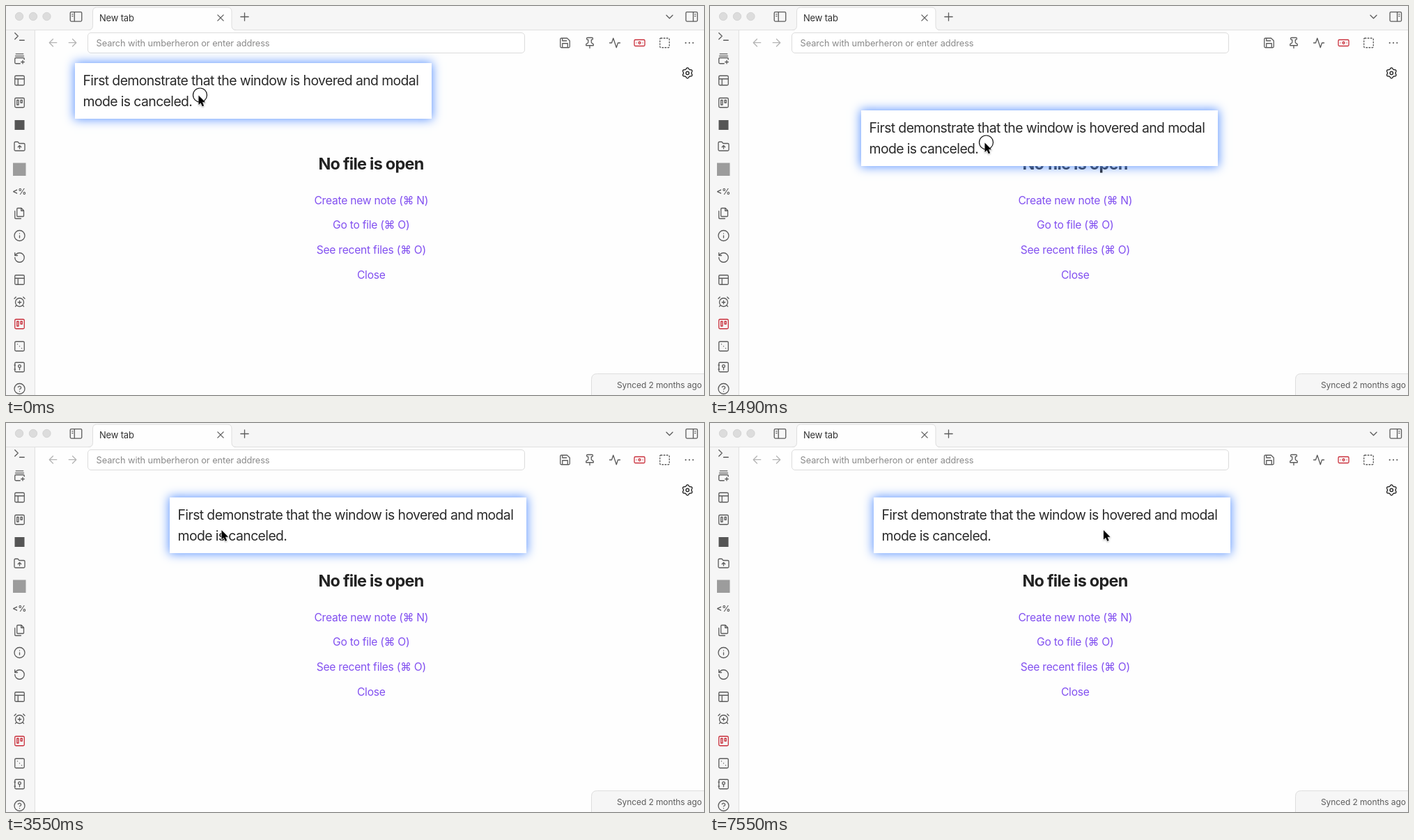
Animation of 1002 by 559 pixels, one loop 8 s. Source, as an HTML page:

```html
<!DOCTYPE html>
<html lang="en">
<head>
<meta charset="utf-8">
<title>Hover window</title>
<style>
html, body { margin: 0; width: 100%; height: 100%; overflow: hidden; background: #fefefe; }
body { position: relative; font-family: Inter, "DejaVu Sans", sans-serif; }
svg { position: absolute; left: 0; top: 0; display: block; overflow: visible; }
text { fill: #222; }
.icon { fill: none; stroke: #5c5c5c; stroke-width: 1.75; stroke-linecap: round; stroke-linejoin: round; }
.red { stroke: #c9303c; }
.pale { stroke: #b4b4b4; }
.dark { stroke: #1c1c1c; }
.small { font-size: 13px; letter-spacing: -.015em; fill: #333; }
.hint { font-size: 12.8px; letter-spacing: -.006em; fill: #8a8a8a; }
.status { font-size: 12px; letter-spacing: -.008em; fill: #5c5c5c; }
.title { font-size: 23.4px; font-weight: 650; letter-spacing: -.031em; text-anchor: middle; }
.link { font-size: 15.6px; letter-spacing: -.015em; text-anchor: middle; fill: #8250f0; }
.code { font-size: 12px; font-weight: 600; text-anchor: middle; fill: #555; }
#note {
  position: absolute; left: 0; top: 0; width: 512px; height: 80px; box-sizing: border-box;
  padding: 10px 0 0 11.5px; background: #fff; box-shadow: 0 0 14px 1px #5c94ff;
  color: #2a2a2a; font-size: 19.4px; line-height: 30px; letter-spacing: -.031em; white-space: nowrap;
}
#pointer { filter: drop-shadow(0 1px 1px rgba(0, 0, 0, .3)); }
</style>
</head>
<body>
<svg id="app" width="1002" height="559" viewBox="0 0 1002 559">
  <rect width="1002" height="34.5" fill="#f6f6f6"/>
  <rect y="34" width="41" height="525" fill="#f6f6f6"/>
  <path d="M0 34.5H1002M41.5 35V559" stroke="#e0e0e0" fill="none"/>
  <path d="M118 35q6.5 0 6.500-6V8q0-6 6-6H318q6 0 6 6V29q0 6 6.500 6z" fill="#fefefe"/>
  <path d="M118 34.500q6.500 0 6.500-6V8q0-6 6-6H318q6 0 6 6V28.500q0 6 6.500 6" fill="none" stroke="#dedede"/>
  <g fill="#dcdcdc" stroke="#cfcfcf" stroke-width=".8">
    <circle cx="19" cy="15" r="5.700"/><circle cx="39" cy="15" r="5.700"/><circle cx="58.500" cy="15" r="5.700"/>
  </g>
  <rect x="117.500" y="38.500" width="627" height="29" rx="4.500" fill="#fff" stroke="#dcdcdc"/>
  <path d="M840.500 560V536.500q0-8 8-8H1003V560z" fill="#f6f6f6" stroke="#dedede"/>

  <rect x="12.500" y="164" width="14" height="14" fill="#555"/>
  <rect x="10" y="225.500" width="18.500" height="18.500" fill="#9c9c9c"/>
  <text class="code" x="19.300" y="270.500">&lt;%</text>

  <text class="small" x="134" y="21.700">New tab</text>
  <text class="hint" x="129.500" y="57.500">Search with umberheron or enter address</text>
  <text class="title" x="524" y="234.500">No file is open</text>
  <text class="link" x="524.300" y="284.500">Create new note (⌘ N)</text>
  <text class="link" x="524.300" y="320.300">Go to file (⌘ O)</text>
  <text class="link" x="524.300" y="356">See recent files (⌘ O)</text>
  <text class="link" x="524.300" y="391.700">Close</text>
  <text class="status" x="877" y="548.700">Synced 2 months ago</text>
</svg>

<div id="note">First demonstrate that the window is hovered and modal<br>mode is canceled.</div>

<svg width="1002" height="559" viewBox="0 0 1002 559">
  <g id="hand">
    <path id="pointer" d="M0 0V13.500L3.100 10.700 5.300 15.700 7.600 14.700 5.500 9.800 9.600 9.700Z"
      fill="#000" stroke="#fff" stroke-width="1.100" paint-order="stroke"/>
    <circle id="press" cx="2" cy="-.5" r="10" fill="none" stroke="#111" stroke-width="1.200"/>
  </g>
</svg>

<script>
const $ = id => document.getElementById(id);

// Icons, drawn on a 24 unit grid around (12, 12)
const ring = (x, y, r) => `M${x - r} ${y}a${r} ${r} 0 1 0 ${2 * r} 0a${r} ${r} 0 1 0 ${-2 * r} 0`;
const box = (x, y, w, h, r = 2) =>
  `M${x + r} ${y}h${w - 2 * r}q${r} 0 ${r} ${r}v${h - 2 * r}q0 ${r} ${-r} ${r}` +
  `h${2 * r - w}q${-r} 0 ${-r} ${-r}v${2 * r - h}q0 ${-r} ${r} ${-r}z`;
const dot = (x, y) => `M${x} ${y}h.01`;

const gear = () => {
  const rim = Array.from({ length: 72 }, (_, i) => {
    const a = i * Math.PI / 36;
    const r = 8.8 + 1.2 * Math.cos(6 * a);
    return (12 + r * Math.sin(a)).toFixed(2) + ' ' + (12 - r * Math.cos(a)).toFixed(2);
  });
  return `M${rim.join('L')}z` + ring(12, 12, 3);
};

const frame = box(3, 3, 18, 18);
const layout = frame + 'M3 9h18M9 21V9';
const board = frame + box(7, 7, 3, 9, 0) + box(14, 7, 3, 5, 0);
const disc = ring(12, 12, 10);

const icons = [
  // ribbon
  [19.5, 44, 'M3 17l6-6-6-6M12 19h9'],
  [19.5, 76, 'M5 2.500h14M4 6.500h16M21 13v-1q0-2-2-2H5q-2 0-2 2v7q0 2 2 2h8M18 15v6M15 18h6'],
  [19.5, 107, layout],
  [19.5, 139, board],
  [19.5, 202, 'M4 20h16a2 2 0 0 0 2-2V8a2 2 0 0 0-2-2h-8q-1 0-1.600-.9l-.8-1.200Q9 3 8 3H4a2 2 0 0 0-2 2v13a2 2 0 0 0 2 2zM12 10v6M9 13l3-3 3 3'],
  [19.5, 298, 'M15.500 2H8.500Q7 2 7 3.500v13Q7 18 8.500 18h10q1.500 0 1.500-1.500v-10zM15 2v5h5M3 7.600v13Q3 22 4.500 22h10'],
  [19.5, 330, disc + 'M12 16v-4' + dot(12, 8)],
  [19.5, 361.5, 'M3 12a9 9 0 1 0 9-9 9.750 9.750 0 0 0-6.740 2.740L3 8M3 3v5h5'],
  [19.5, 393.5, layout],
  [19.5, 425, ring(12, 13, 8) + 'M5 3 2 6M22 6l-3-3M6.400 18.700 4 21M17.600 18.700 20 21M12 10v6M9 13h6'],
  [19.5, 457, board, 'red'],
  [19.5, 489, frame + dot(8, 8) + dot(12, 12) + dot(16, 16)],
  [19.5, 519, frame + ring(12, 10, 2.5) + 'M12 12.500v4.500M2 8h2M2 16h2'],
  [19.5, 550, disc + 'M9.100 9a3 3 0 0 1 5.800 1c0 2-3 3-3 3' + dot(12, 17)],
  // tab bar
  [100.5, 15.3, box(1, 3, 22, 18) + 'M9 3v18M4.500 7.500h1.500M4.500 11h1.500'],
  [308, 17, 'M6.500 6.500l11 11M17.500 6.500l-11 11'],
  [342.5, 15.5, 'M12 4.500v15M4.500 12h15'],
  [952.5, 15.5, 'M6 9l6 6 6-6'],
  [984.3, 15.3, box(1, 3, 22, 18) + 'M15 3v18M18 7.500h1.500M18 11h1.500'],
  // toolbar
  [67.5, 52.7, 'M19 12H5M12 19l-7-7 7-7', 'pale'],
  [95.5, 52.7, 'M5 12h14M12 5l7 7-7 7', 'pale'],
  [802.5, 53, 'M19 21H5q-2 0-2-2V5q0-2 2-2h11l5 5v11q0 2-2 2zM17 21v-8H7v8M7 3v5h8'],
  [838, 53, 'M12 17v5M5 17h14v-1.800q0-1.200-1.100-1.800l-1.800-.9Q15 12 15 10.800V6h1a2 2 0 0 0 0-4H8a2 2 0 0 0 0 4h1v4.800q0 1.200-1.100 1.700l-1.800.9Q5 14 5 15.200z'],
  [874, 53, 'M22 12h-4l-3 9L9 3l-3 9H2'],
  [909.5, 53, box(2, 6, 20, 12) + ring(12, 12, 2) + dot(6, 12) + dot(18, 12), 'red'],
  [945.5, 53, frame, '', '2.2 3.2'],
  [981, 53, ring(5, 12, .6) + ring(12, 12, .6) + ring(19, 12, .6)],
  [978.3, 96.3, gear(), 'dark'],
];

for (const [x, y, d, tone = '', dash] of icons) {
  const path = document.createElementNS('http://www.w3.org/2000/svg', 'path');
  path.setAttribute('d', d);
  path.setAttribute('class', 'icon ' + tone);
  path.setAttribute('transform', `translate(${x} ${y}) scale(.75) translate(-12 -12)`);
  if (dash) path.setAttribute('stroke-dasharray', dash);
  $('app').append(path);
}

// Each move: first step, last step, number of steps, evenly spaced waypoints
const LOOP = 8000;
const RELEASE = 2670;
const GRIP = [177.5, 46.5];

const drag = [
  [450, 750, 3, [[99, 82], [171, 99]]],
  [1050, 2080, 8, [[171, 99], [204.5, 121], [217, 150], [223, 94], [228.5, 112]]],
  [2220, 2370, 2, [[228.5, 112], [235, 107]]],
];
const roam = [
  [RELEASE, 3700, 8, [[412.5, 153.5], [340, 160], [266, 166], [290, 158], [329, 150]]],
  [3850, 4450, 5, [[329, 150], [540, 139], [758, 150]]],
  [4750, 5190, 4, [[758, 150], [752.5, 149], [660, 157], [520, 171], [406.5, 181]]],
  [5490, 6230, 6, [[406.5, 181], [500, 225], [760, 430], [885, 549]]],
  [6520, 7550, 8, [[885, 549], [888, 520], [800, 380], [640, 210], [565, 154]]],
];

function along(points, f) {
  const s = f * (points.length - 1);
  const i = Math.min(Math.floor(s), points.length - 2);
  return points[i].map((v, k) => v + (points[i + 1][k] - v) * (s - i));
}

function locate(moves, t) {
  let pos = moves[0][3][0];
  for (const [start, end, steps, points] of moves) {
    if (t < start) break;
    let done = 0;
    while (done < steps && t >= Math.floor((start + (end - start) * done / (steps - 1)) / 10) * 10) done++;
    pos = along(points, done / steps);
  }
  return pos;
}

function draw(now) {
  const t = now % LOOP;
  const held = t < RELEASE;
  const [bx, by] = locate(drag, t);
  const [x, y] = held ? [bx + GRIP[0], by + GRIP[1]] : locate(roam, t);
  $('note').style.transform = `translate(${bx}px, ${by}px)`;
  $('hand').setAttribute('transform', `translate(${x} ${y})`);
  $('press').style.display = held ? '' : 'none';
}

const begin = performance.now();
function tick() {
  draw(performance.now() - begin);
  requestAnimationFrame(tick);
}
tick();
</script>
</body>
</html>
```
